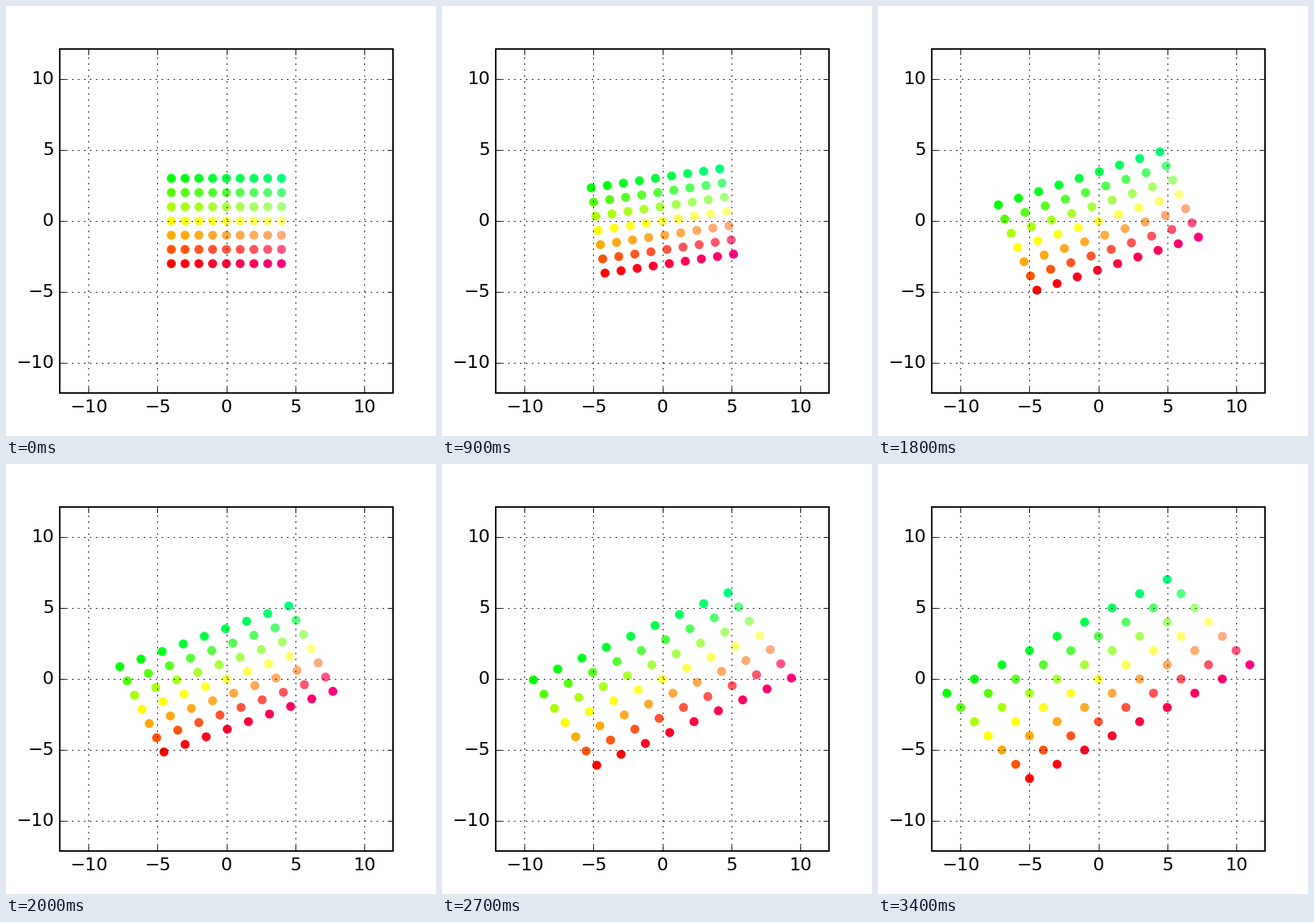
These frames come from a looping animation (600x600 px, 3900 ms). A matplotlib script:

```python
import numpy as np
import matplotlib.pyplot as plt
from matplotlib.animation import FuncAnimation

STEP_MS = 100
FRAMES = 39
HOLD = 4        # still steps before the motion starts
MOVES = 30
LIMIT = 12.1
MATRIX = np.array([[2, -1], [1, 1]])

plt.rcParams.update({
    "font.family": "DejaVu Sans",
    "font.size": 12,
    "text.kerning_factor": 6,
    "axes.linewidth": 1.0,
    "axes.axisbelow": False,
    "grid.color": "black",
    "grid.linestyle": ":",
    "grid.linewidth": 0.5,
    "lines.dotted_pattern": [1, 3],
    "lines.scale_dashes": False,
    "ytick.alignment": "center",
})
for axis in ("xtick", "ytick"):
    plt.rcParams.update({
        f"{axis}.direction": "in",
        f"{axis}.major.size": 4,
        f"{axis}.major.width": 0.5,
        f"{axis}.major.pad": 4,
        f"{axis}.labelsize": 12,
    })


def color(x, y):
    return min(1, 1 - y / 3), min(1, 1 + y / 3), 0.25 + x / 16


def transformed(t):
    blend = (1 - t) * np.eye(2) + t * MATRIX
    return points @ blend.T


points = np.array([(x, y) for x in range(-4, 5) for y in range(-3, 4)], float)

fig = plt.figure(figsize=(4, 4), dpi=150, facecolor="white")
ax = fig.add_axes([0.125, 0.1, 0.775, 0.8])
ax.set(xlim=(-LIMIT, LIMIT), ylim=(-LIMIT, LIMIT),
       xticks=range(-10, 11, 5), yticks=range(-10, 11, 5))
ax.tick_params(top=True, right=True)
ax.grid(True)

dots = ax.scatter(*points.T, s=36, c=[color(x, y) for x, y in points],
                  edgecolors="none", zorder=1)


def update(frame):
    t = np.clip((frame - HOLD) / MOVES, 0, 1)
    dots.set_offsets(transformed(t))
    return dots,


anim = FuncAnimation(fig, update, frames=FRAMES, interval=STEP_MS,
                     repeat=True, repeat_delay=0, blit=False)
plt.show()
```
